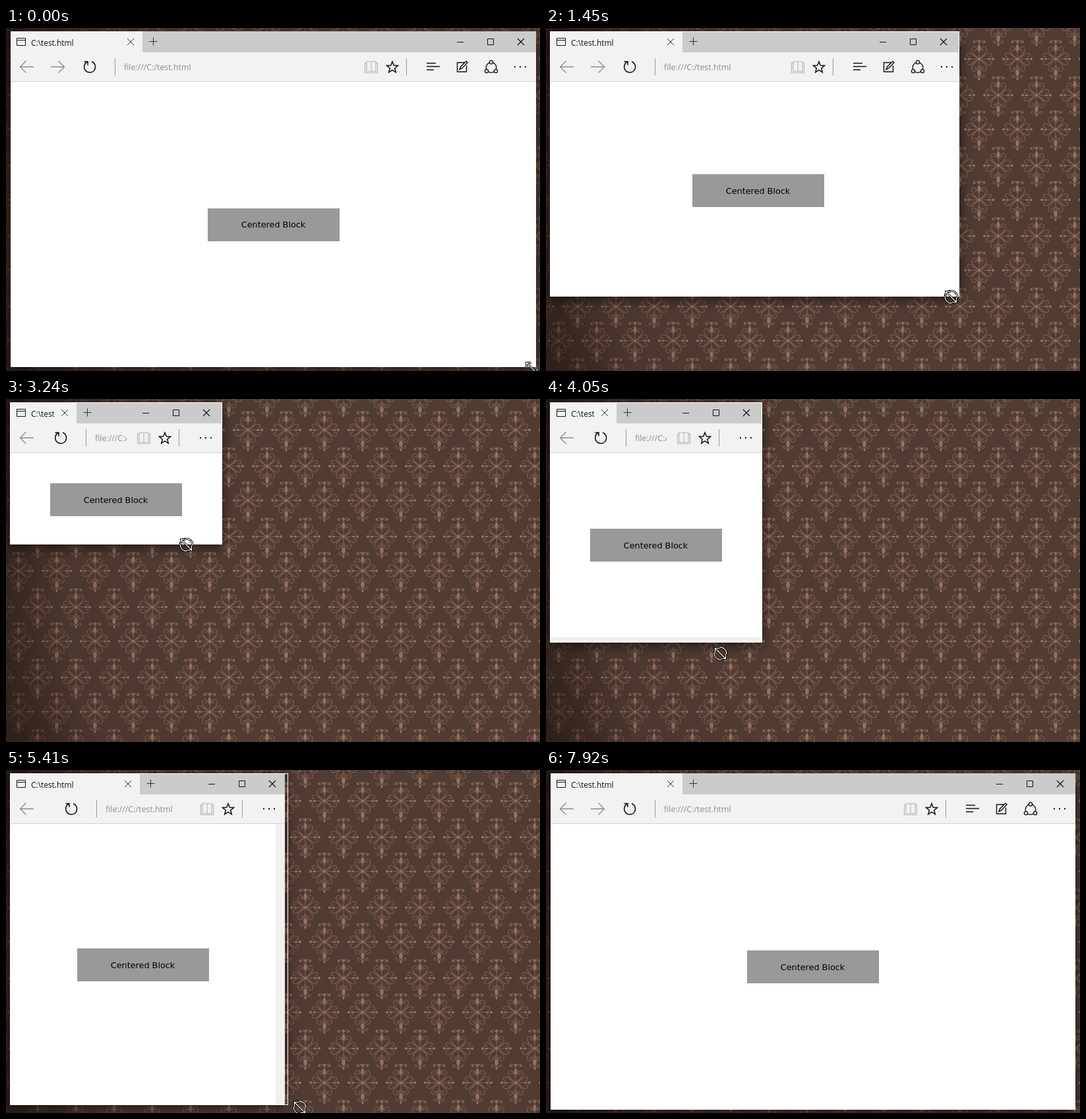
Recreate the animation shown at these times as an HTML page with a canvas. Size 810 by 521 pixels, loop 8020 ms.

```html
<!DOCTYPE html>
<html lang="en">
<head>
<meta charset="utf-8">
<title>Centered block</title>
<style>
  html, body { margin: 0; width: 810px; height: 521px; overflow: hidden; background: #4f3b32; }
  canvas { display: block; }
</style>
</head>
<body>
<canvas id="stage" width="810" height="521"></canvas>
<script>
const LOOP = 8020;
const canvas = document.getElementById('stage');
const g = canvas.getContext('2d');

// Moments at which the screen refreshes: first, last, count
const times = [
  [0, 0, 1], [500, 500, 1], [780, 1720, 8], [1870, 2810, 8], [2960, 2960, 1],
  [3240, 4170, 8], [4320, 5260, 8], [5410, 6350, 8], [6470, 6630, 2],
  [7030, 7480, 4], [7920, 7920, 1]
].flatMap(([a, b, n]) => Array.from({ length: n }, (_, i) =>
  n > 1 ? Math.floor((a + (b - a) * i / (n - 1)) / 10) * 10 : a));

// time, cursor x, y, window right, bottom, painted right, page right, page bottom
const keys = [
  [0, 797, 516, 804, 515, 804, 804, 515],
  [780, 770, 503, 783, 503, 786, 789, 506],
  [1450, 614, 408, 627, 408, 632, 637, 412],
  [1720, 533, 367, 546, 367, 551, 556, 371],
  [2810, 300, 241, 313, 241, 313, 313, 244],
  [2960, 282, 230, 300, 230, 300, 300, 234],
  [3240, 273, 221, 290, 221, 290, 290, 224],
  [3370, 270, 200, 285, 200, 285, 285, 204],
  [4030, 264, 386, 255, 370, 255, 255, 362],
  [4170, 265, 433, 255, 417, 255, 255, 409],
  [4720, 300, 510, 283, 507, 280, 276, 503],
  [5260, 380, 513, 363, 509, 358, 347, 509],
  [5410, 445, 512, 428, 509, 423, 409, 510],
  [6350, 776, 514, 776, 512, 764, 755, 510],
  [6470, 799, 516, 801, 514, 788, 785, 510],
  [6630, 803, 518, 804, 515, 804, 804, 515],
  [7480, 816, 530, 804, 517, 804, 804, 517],
  [7920, 830, 540, 803, 516, 803, 803, 516]
];

const icons = {
  tab: 'M-6.5-5.5h13v11h-13zM-6.5-2.5h13',
  cross: 'M-5-5L5 5M5-5L-5 5',
  plus: 'M-6 .5H6M0-5.5V6.5',
  minimise: 'M-5 .5H5',
  maximise: 'M-4.5-4.5h9v9h-9z',
  back: 'M10 0H-10M-1.5-9L-10.5 0L-1.5 9',
  forward: 'M-10 0H10M1.5-9L10.5 0L1.5 9',
  refresh: 'M-3.5-7.7A8.5 8.5 0 1 0 3-8M-8.5-8h5.5v5.5',
  book: 'M-7-8h7v15h-7zM0-8h7v15H0zM-7-6h-2.5v15h19v-15h-2.5',
  star: 'M0-9L2.3-3.2 8.6-2.8 3.7 1.2 5.3 7.3 0 3.9-5.3 7.3-3.7 1.2-8.6-2.8-2.3-3.2z',
  hub: 'M-10-5.5H4M-10-.5H10M-10 4.5H1',
  note: 'M3-6.5H-7.5V7.5H6.5V-2M-4 4L-2.5 0L6-8.5L8-6.5L-.5 2.5z',
  arrow: 'M-8-8L8 8M-8-1V-8H-1M8 1V8H1',
  scroll: 'M0 0C4-3 9-7 11-12C13-18 6-21 4-16C3-13 7-12 7-15M0 0C8-3 11-10 16-9C21-7 18-2 15-4' +
    'M0-23C2-29 8-29 8-26C8-24 5-24 5-26M0-10C3-12 3-17 0-21'
};
for (const name in icons) icons[name] = new Path2D(icons[name]);

function icon(name, x, y, color = '#111', width = 1, c = g) {
  c.save();
  c.translate(x, y);
  c.strokeStyle = color;
  c.lineWidth = width;
  c.stroke(icons[name]);
  c.restore();
}

function box(color, left, top, right, bottom) {
  g.fillStyle = color;
  if (right > left && bottom > top) g.fillRect(left, top, right - left, bottom - top);
}

function text(str, x, y, font, color, limit = 810) {
  g.save();
  g.beginPath();
  g.rect(0, 0, limit, 521);
  g.clip();
  g.font = font;
  g.fillStyle = color;
  g.fillText(str, x, y);
  g.restore();
}

function dot(c, x, y, rx, ry = rx) {
  c.beginPath();
  c.ellipse(x, y, rx, ry, 0, 0, 7);
  c.fill();
}

function ornament(c, x, y) {
  c.save();
  c.translate(x, y);
  for (const [sx, sy] of [[1, 1], [-1, 1], [1, -1], [-1, -1]]) {
    c.save();
    c.scale(sx, sy);
    icon('scroll', 0, 0, '#80614f', 1.1, c);
    c.restore();
  }
  c.fillStyle = '#80614f';
  c.fillRect(-22, -.5, 44, 1);
  c.fillRect(-.5, -29, 1, 60);
  c.fillStyle = '#947062';
  dot(c, 0, -17, 2.3, 4.5);
  dot(c, 0, 21, 2.8, 4.5);
  dot(c, 0, 0, 2.2);
  dot(c, 0, -27, 1.7);
  dot(c, 0, 30, 1.6, 2.4);
  for (const s of [-1, 1]) {
    dot(c, s * 21, 0, 2);
    dot(c, s * 15, 0, 2.2, 1.5);
    dot(c, s * 8, -26, 1.4);
  }
  c.restore();
}

function makeWallpaper() {
  const paper = document.createElement('canvas');
  paper.width = 810;
  paper.height = 521;
  const c = paper.getContext('2d');
  c.fillStyle = '#503c33';
  c.fillRect(0, 0, 810, 521);
  for (let row = -1; row < 10; row++) {
    const odd = row & 1;
    const y = 47 + 107 * (row - odd) / 2 + odd * 55;
    for (let x = odd ? -10 : 19; x < 850; x += 58) ornament(c, x, y);
  }
  const shade = c.createRadialGradient(600, 300, 330, 600, 300, 690);
  shade.addColorStop(0, 'rgba(18,8,6,0)');
  shade.addColorStop(.5, 'rgba(18,8,6,.1)');
  shade.addColorStop(1, 'rgba(18,8,6,.78)');
  c.fillStyle = shade;
  c.fillRect(0, 0, 810, 521);
  return paper;
}
const wallpaper = makeWallpaper();

function stateAt(t) {
  const now = times.filter(s => s <= t).pop();
  const i = Math.max(0, keys.findLastIndex(k => k[0] <= now));
  const a = keys[i], b = keys[i + 1] || a;
  const f = b === a ? 0 : (now - a[0]) / (b[0] - a[0]);
  const [, cx, cy, right, bottom, painted, pageRight, pageBottom] =
    a.map((v, j) => Math.round(v + (b[j] - v) * f));
  return {
    cx, cy, bottom, pageBottom,
    right: Math.max(328, right),
    painted: Math.max(327, painted),
    pageRight: Math.max(327, pageRight),
    dragging: now >= 500 && now < 6630
  };
}

function drawTitleBar(s) {
  const tab = Math.min(207, s.painted - 220);
  box('#cbcbcb', 6, 5, s.painted, 37);
  box('#f2f2f2', 6, 5, tab, 37);
  icon('tab', 23, 21);
  text('C:\\test.html', 38, 27, '11.9px "Open Sans", "Noto Sans", sans-serif', '#111', tab - 34);
  icon('cross', tab - 18, 21, '#333');
  icon('plus', tab + 16.5, 20, '#333');
  const x = s.right - (s.dragging ? 24 : 23);
  icon('minimise', x - 92, 21);
  icon('maximise', x - 46, 21);
  icon('cross', x, 21, '#111', 1.2);
}

function drawToolbar(s) {
  const narrow = s.painted < 500;
  const sep = Math.min(165, Math.max(121, s.painted - 286));
  const dots = s.painted - 24;
  const tools = dots + (narrow ? 132 : 0);
  box('#f2f2f2', 6, 37, s.painted, 81);
  box('#cfcfcf', 6, 81, s.painted, 82);
  icon('back', 32, 59, '#8c8c8c', 1.3);
  if (!narrow) icon('forward', 78, 59, '#8c8c8c', 1.3);
  icon('refresh', sep - 38, 59, '#111', 1.5);
  box('#999', sep, 46, sep + 1, 72);
  text('file:///C:/test.html', sep + 14, 64,
    '12.4px "Open Sans", "Noto Sans", sans-serif', '#8c8c8c', tools - 252);
  icon('book', tools - 226, 59, '#b4b4b4', 1.1);
  icon('star', tools - 194, 60, '#111', 1.5);
  box('#999', tools - 173, 46, tools - 172, 72);
  if (!narrow) {
    icon('hub', dots - 132, 59, '#111', 1.3);
    icon('note', dots - 88, 59, '#111', 1.4);
    drawShare(dots - 44, 60);
  }
  for (const d of [-8, 0, 8]) box('#111', dots + d - 1, 58, dots + d + 1, 60);
}

function drawShare(x, y) {
  g.strokeStyle = '#111';
  g.fillStyle = '#f2f2f2';
  g.lineWidth = 1.3;
  for (const [dx, dy, r] of [[0, 0, 7.8], [0, -8, 2.6], [-7, 5.5, 2.6], [7, 5.5, 2.6]]) {
    dot(g, x + dx, y + dy, r);
    g.stroke();
  }
}

function drawPage(s) {
  box('#f0f0f0', s.pageRight, 82, s.painted, s.bottom - 1);
  box('#f0f0f0', 6, s.pageBottom, s.painted, s.bottom - 3);
  const left = Math.round((7 + s.pageRight) / 2 - 100);
  const top = (82 + s.pageBottom) / 2 - 25;
  const y = Math.round(top);
  box('#999', left, y, left + 200, y + 50);
  g.textAlign = 'center';
  text('Centered Block', left + 99.5, Math.floor(top) + 30,
    '12.8px "DejaVu Sans", Verdana, sans-serif', '#000');
  g.textAlign = 'left';
}

function drawWindow(s) {
  const left = s.dragging ? 6 : 7;
  g.save();
  g.shadowColor = 'rgba(0,0,0,.65)';
  g.shadowBlur = 18;
  g.shadowOffsetY = 4;
  box('#fff', left, 5, Math.min(s.painted, s.right), s.bottom);
  g.restore();

  g.save();
  g.beginPath();
  g.rect(left, 5, s.right - left, s.bottom - 5);
  g.clip();
  box('#fff', s.painted, 5, s.right - 6, s.bottom);
  drawTitleBar(s);
  drawToolbar(s);
  drawPage(s);
  g.restore();

  if (s.dragging) {
    g.strokeStyle = '#fff';
    g.lineWidth = 1;
    g.strokeRect(6.5, 5.5, s.right - 7, s.bottom - 6);
  }
}

function drawCursor(s) {
  if (s.dragging) {
    for (const [color, width] of [['#000', 3], ['#fff', 1.2]]) {
      g.strokeStyle = color;
      g.lineWidth = width;
      g.beginPath();
      g.arc(s.cx + .5, s.cy + .5, 9.3, 0, 7);
      g.stroke();
    }
  }
  icon('arrow', s.cx + .5, s.cy + .5, '#000', 3);
  icon('arrow', s.cx + .5, s.cy + .5, '#fff', 1.2);
}

function draw(now) {
  const s = stateAt(now % LOOP);
  g.drawImage(wallpaper, 0, 0);
  drawWindow(s);
  drawCursor(s);
  requestAnimationFrame(draw);
}
requestAnimationFrame(draw);
</script>
</body>
</html>
```
